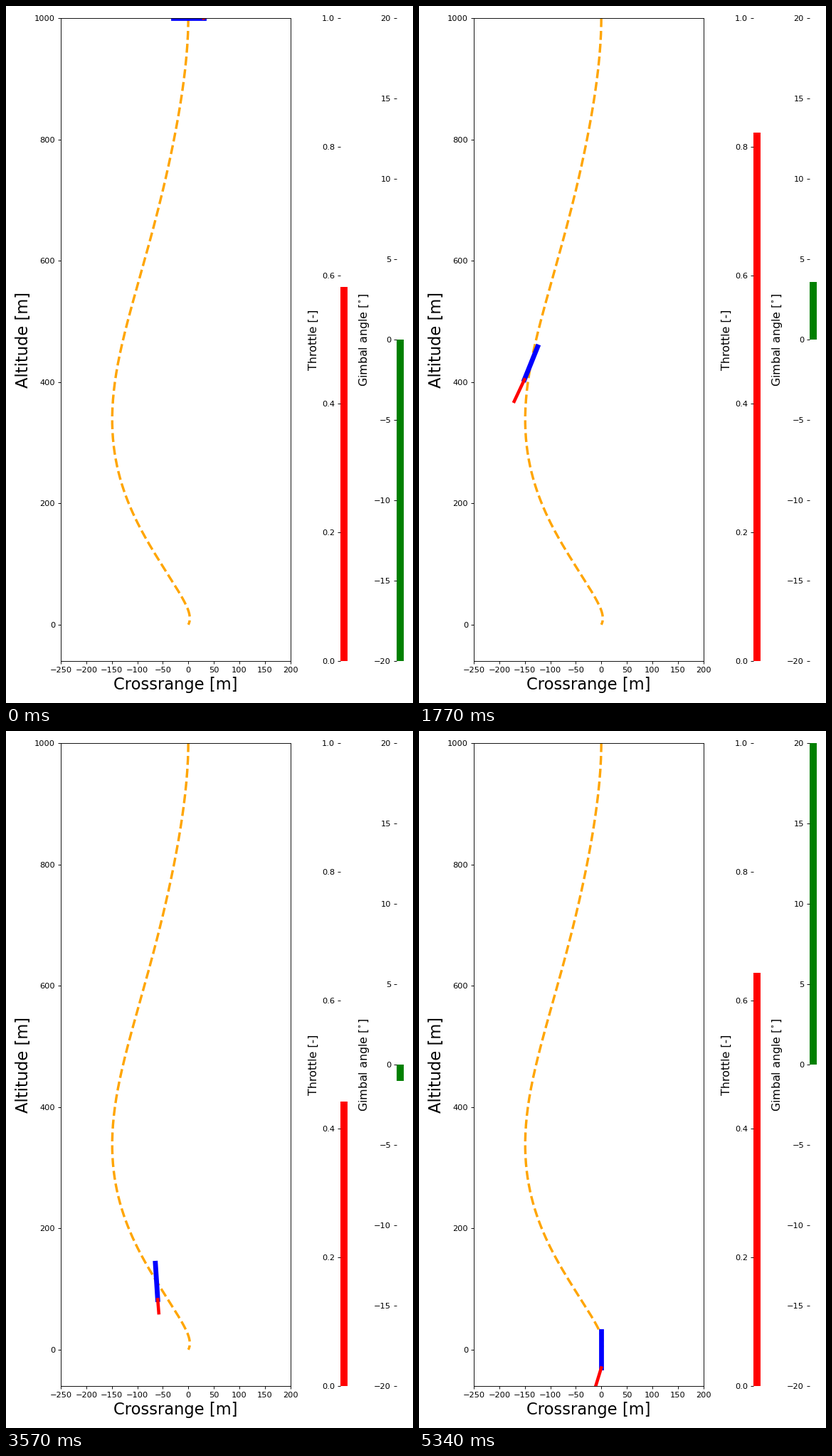
A matplotlib script for the animation above (5370 ms loop, 572x980 px).

```python
import numpy as np
import matplotlib.pyplot as plt
from matplotlib.animation import FuncAnimation

W, H, DPI = 572, 980, 80
FRAMES, INTERVAL = 179, 30
K = 1.021                      # point size factor
HALF_LEN, FLAME = 30, 50       # metres


def spline(keys, s, ends=None):
    """Cubic spline through rows of (time, values); ends holds the end slopes."""
    keys = np.array(keys, float)
    t, v = keys[:, 0], keys[:, 1:]
    h, n = np.diff(t), len(t)
    d = np.diff(v, axis=0) / h[:, None]
    a, b = np.eye(n), np.zeros_like(v)
    for i in range(1, n - 1):
        a[i, i - 1:i + 2] = h[i], 2 * (h[i - 1] + h[i]), h[i - 1]
        b[i] = 3 * (h[i] * d[i - 1] + h[i - 1] * d[i])
    if ends is None:
        a[0, 1] = a[-1, -2] = .5
        b[0], b[-1] = 1.5 * d[0], 1.5 * d[-1]
    else:
        b[0], b[-1] = ends
    m = np.linalg.solve(a, b)
    i = np.clip(np.searchsorted(t, s, side="right") - 1, 0, n - 2)
    u, hi = ((s - t[i]) / h[i])[:, None], h[i][:, None]
    out = ((1 + 2 * u) * (1 - u) ** 2 * v[i] + u * u * (3 - 2 * u) * v[i + 1]
           + hi * u * (1 - u) * ((1 - u) * m[i] - u * m[i + 1]))
    return out.T


step = np.arange(FRAMES)
last = FRAMES - 1

# step, crossrange, altitude, tilt in degrees
poses = [(0, 0, 1000, -90), (18, -22, 826.7, -57.5), (36, -71.4, 645, -13.8),
         (59, -137.8, 431, 25.6), (82, -143.5, 278.5, 24.7),
         (119, -62.2, 112.5, -4.4), (152, .6, 22, -18), (last, 0, 0, 0)]
x, y, tilt = spline(poses, step, ends=[(0, -8.85, 0), (0, 0, 0)])
theta = np.radians(tilt)

# the engine cannot run below 40 %
power = [(0, .582), (9, .4), (36, .4), (54, .82), (59, .822), (82, .627),
         (119, .442), (152, .594), (last, .643)]
throttle = np.maximum(spline(power, step)[0], .4)

# gentle steering plus a hard kick at either end
steer = np.interp(step, [36, 45, 59, 152, last], [-.2, 4.2, 3.58, -3.55, -3.8])
flip = -19.8 * np.maximum(0, 1 - step / 17)
settle = 23.8 * np.maximum(0, 1 - (last - step) / 14) ** 2.5
gimbal = steer + flip + settle

plt.rcParams.update({
    "font.family": "DejaVu Sans", "font.size": 10 * K, "axes.linewidth": .8 * K,
    "axes.labelpad": 4 * K})
for side in ("xtick.major.", "ytick.major."):
    plt.rcParams.update({side + "size": 3.5 * K, side + "pad": 3.5 * K,
                         side + "width": .8 * K})
fig = plt.figure(figsize=(W / DPI, H / DPI), dpi=DPI, facecolor="white")


def panel(left, right, top=17, bottom=921):
    return fig.add_axes([left / W, 1 - bottom / H, (right - left) / W, (bottom - top) / H])


def gauge(left, low, high, every, label, color):
    ax = panel(left, left + 10)
    ax.set(xlim=(0, 1), ylim=(low, high), xticks=[],
           yticks=np.arange(low, high + every / 2, every))
    ax.set_frame_on(False)
    ax.set_ylabel(label, fontsize=14 * K)
    return ax.bar(.5, 0, width=1, color=color)[0]


ax = panel(77, 399.5)
ax.set(xlim=(-250, 200), ylim=(-60, 1000),
       xticks=range(-250, 201, 50), yticks=range(0, 1001, 200))
ax.set_xlabel("Crossrange [m]", fontsize=20 * K)
ax.set_ylabel("Altitude [m]", fontsize=20 * K)
ax.plot(x, y, "--", color="orange", lw=3 * K)
body, = ax.plot([], [], color="blue", lw=6 * K)
flame, = ax.plot([], [], color="red", lw=4 * K)
throttle_bar = gauge(470, 0, 1, .2, "Throttle [-]", "red")
gimbal_bar = gauge(549, -20, 20, 5, r"Gimbal angle [$^{\circ}$]", "green")


def heading(angle):
    return np.array([np.sin(angle), np.cos(angle)])


def draw(i):
    center, axis = np.array([x[i], y[i]]), HALF_LEN * heading(theta[i])
    tail = center - axis
    tip = tail - FLAME * throttle[i] * heading(theta[i] + np.radians(gimbal[i]))
    body.set_data(*zip(center + axis, tail))
    flame.set_data(*zip(tail, tip))
    throttle_bar.set_height(throttle[i])
    gimbal_bar.set_height(gimbal[i])
    return body, flame, throttle_bar, gimbal_bar


anim = FuncAnimation(fig, draw, frames=FRAMES, init_func=lambda: draw(0),
                     interval=INTERVAL, repeat=True, repeat_delay=0)
plt.show()
```
